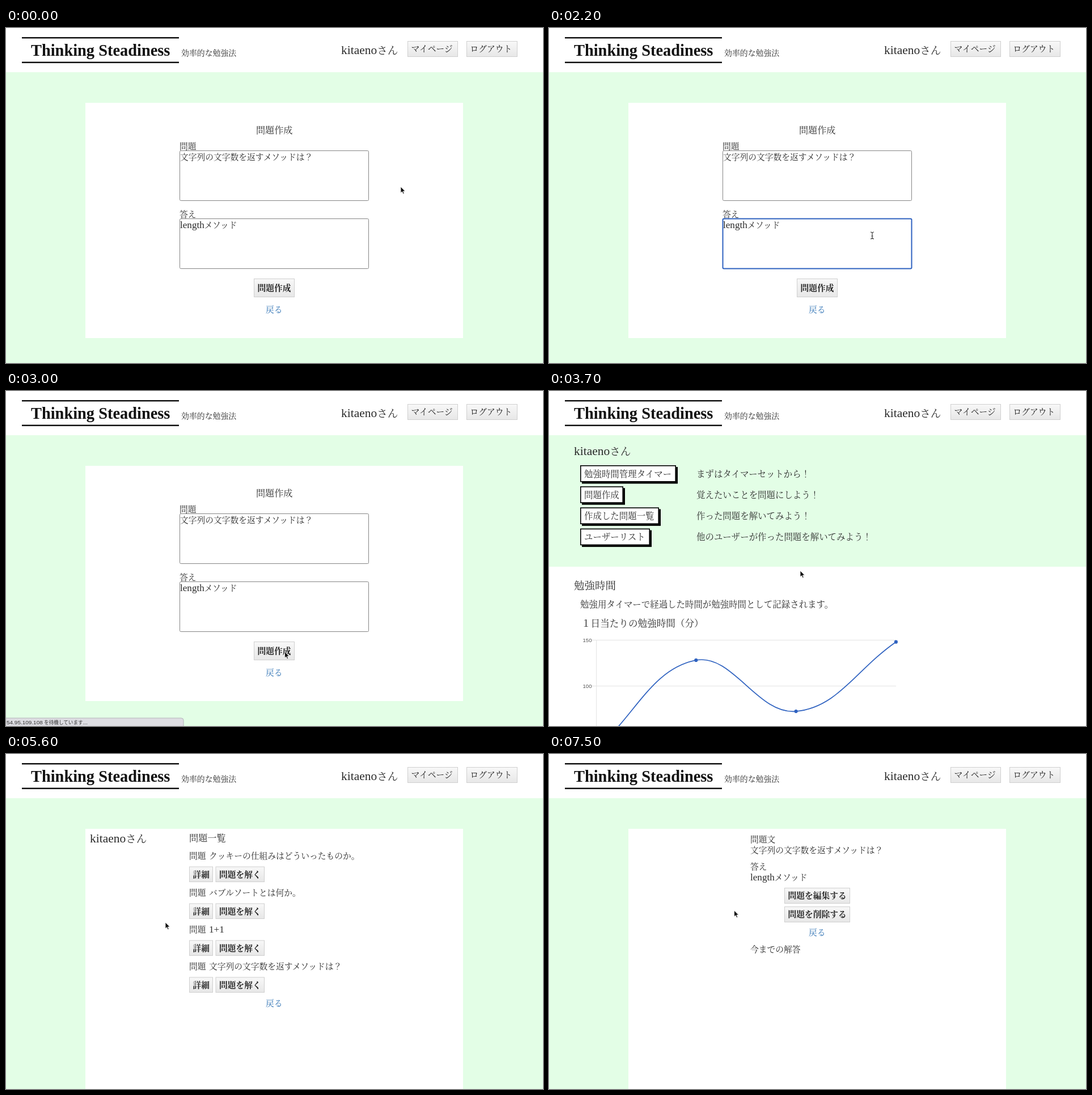
An HTML page for the animation above (7.6 s loop, 947 by 591 pixels).

```html
<!DOCTYPE html>
<html lang="ja">
<head>
<meta charset="utf-8">
<style>
  html, body { margin: 0; width: 100%; height: 100%; overflow: hidden; background: #fff; }
  svg { display: block; width: 947px; height: 591px; }
  text { font-family: "Liberation Serif", "Noto Serif CJK JP", "Noto Sans CJK JP", "Noto Sans CJK", serif; font-weight: 500; white-space: pre; }
  .sans { font-family: "Liberation Sans", "Noto Sans CJK JP", "Noto Sans CJK", sans-serif; font-weight: 400; }
  .strong { font-weight: 600; }
  .title { font-weight: 700; }
</style>
</head>
<body>
<svg id="stage" viewBox="0 0 947 591" lang="ja"></svg>
<script>
const LOOP = 7600, GREEN = '#e3fee6', LINK = '#2c70b3', BLUE = '#2f62c0';
const USER = 'kitaenoさん', QUESTION = '文字列の文字数を返すメソッドは？', ANSWER = 'lengthメソッド';

// Text by left edge and vertical centre; Latin runs are set a little larger than kana.
const text = (x, cy, size, str, fill = '#2b2b2b', attrs = '') => {
  const body = str.replace(/[a-z0-9+.\/]+/g, m => `<tspan font-size="${size * 1.16}">${m}</tspan>`);
  return `<text x="${x}" y="${cy + size * .365}" font-size="${size}" fill="${fill}" ${attrs}>${body}</text>`;
};
const rect = (x, y, w, h, fill, attrs = '') =>
  `<rect x="${x}" y="${y}" width="${w}" height="${h}" fill="${fill}" ${attrs}/>`;
const line = (x1, y1, x2, y2, color, width = 1) =>
  `<path d="M${x1} ${y1}L${x2} ${y2}" stroke="${color}" stroke-width="${width}"/>`;
const button = (x, y, w, h, label, style = 'strong') =>
  rect(x + .5, y + .5, w - 1, h - 1, 'url(#face)', 'stroke="#cfcfcf"') +
  text(x + 6.6, y + h / 2, 14.75, label, '#222', `class="${style}"`);
const backLink = cy => text(458, cy, 14.75, '戻る', LINK);
const group = (id, body) => `<g id="${id}">${body}</g>`;

const header = rect(0, 0, 947, 78, '#fff') +
  line(28, 17.3, 305, 17.3, '#111', 2.4) + line(28, 60.8, 305, 60.8, '#111', 2.4) +
  '<text class="title" x="44" y="48.5" font-size="28.4" fill="#111">Thinking Steadiness</text>' +
  text(309, 44, 13.9, '効率的な勉強法') + text(591, 39, 18.5, USER) +
  button(708, 23, 89, 28, 'マイページ', '') + button(812, 23, 90, 28, 'ログアウト', '');

const area = (id, y) =>
  rect(306.5, y + .5, 333, 88, '#fff', `id="${id}" rx="2" stroke="#858585"`);
const formPage = rect(140, 132, 666, 415, '#fff') +
  text(441, 180, 16.1, '問題作成') +
  text(306, 208.5, 14.75, '問題') + area('area1', 216) + text(307, 228, 14.75, QUESTION) +
  '<path id="caret" d="M543.5 221V235" stroke="#555"/>' +
  text(306, 328.5, 14.75, '答え') + area('area2', 336) + text(307, 348, 14.75, ANSWER) +
  button(437, 442, 72, 33, '問題作成') + backLink(497);

const menu = [
  ['勉強時間管理タイマー', 169, 'まずはタイマーセットから！'],
  ['問題作成', 76, '覚えたいことを問題にしよう！'],
  ['作成した問題一覧', 139, '作った問題を解いてみよう！'],
  ['ユーザーリスト', 123, '他のユーザーが作った問題を解いてみよう！']
];
const menuRow = ([label, w, note], i) => {
  const y = 131 + i * 37.2;
  return rect(58, y + 3, w, 29.5, '#000') +
    rect(55.8, y + .8, w - 1.6, 28, '#fff', 'stroke="#000" stroke-width="1.6"') +
    text(62, y + 15, 15.45, label, '#2b2b2b', `id="menu${i}"`) + text(260, y + 15, 15.45, note);
};
const myPage = rect(0, 310, 947, 281, '#fff') + text(44, 106, 18.5, USER) +
  menu.map(menuRow).join('') +
  text(44, 343, 18.5, '勉強時間') +
  text(55, 376.5, 15.45, '勉強用タイマーで経過した時間が勉強時間として記録されます。') +
  text(57, 410, 16.6, '１日当たりの勉強時間（分）') +
  [150, 100].map((v, i) => line(75, 439.5 + i * 81, 612, 439.5 + i * 81, '#e4e4e4') +
    `<text class="sans" x="75.5" y="${442.7 + i * 81}" font-size="9.6" text-anchor="end" fill="#555">${v}</text>`).join('') +
  line(83.5, 439, 83.5, 591, '#e4e4e4') + group('chart', '');

const questions = ['クッキーの仕組みはどういったものか。', 'バブルソートとは何か。', '1+1', QUESTION];
const listPage = rect(140, 132, 666, 459, '#fff') +
  text(148, 149, 18.5, USER) + text(323, 148.5, 16.2, '問題一覧') +
  questions.map((q, i) => {
    const y = 180 + i * 65;
    return text(323, y, 14.75, '問題') + text(358, y, 14.75, q) +
      button(323, y + 18.5, 42, 27.5, '詳細') + button(369.5, y + 18.5, 86.5, 27.5, '問題を解く');
  }).join('') + backLink(440);

const detailPage = rect(140, 132, 666, 459, '#fff') +
  text(355, 151, 14.75, '問題文') + text(355, 169.5, 14.75, QUESTION) +
  text(355, 199, 14.75, '答え') + text(355, 217.5, 14.75, ANSWER) +
  button(415, 236, 116, 28, '問題を編集する') + button(415, 269, 116, 28, '問題を削除する') +
  backLink(315) + text(355, 345, 14.75, '今までの解答');

const pages = [formPage, myPage, listPage, detailPage];
const cursors = {
  arrow: '<path d="M0 0V11L2.6 8.7L4.4 12.8L6.2 12L4.5 8H8Z" fill="#111" stroke="#fff" stroke-width=".8"/>',
  beam: '<path d="M-3 -6Q0 -6 0 -4Q0 -6 3 -6M0 -5V5M-3 6Q0 6 0 4Q0 6 3 6M-1.5 1H1.5" fill="none" stroke="#333" stroke-width="1.1"/>',
  hand: '<path d="M-1 0Q.8 -1 1.2 1L2 4L5.5 4.2Q8 4.5 8 7V10L6.5 13H1L-3 8Q-3 6 -1 7.2L-2 1Z" fill="#fff" stroke="#222"/>'
};

const stage = document.getElementById('stage');
stage.innerHTML = `<defs><linearGradient id="face" x2="0" y2="1">
  <stop stop-color="#f8f8f8"/><stop offset="1" stop-color="#e7e7e7"/></linearGradient></defs>` +
  rect(0, 0, 947, 591, GREEN) + header + pages.map((p, i) => group('page' + i, p)).join('') +
  group('status', '') + group('cursor', Object.entries(cursors).map(e => group(...e)).join(''));
const $ = id => document.getElementById(id);
const show = (id, on) => $(id).setAttribute('display', on ? 'inline' : 'none');

// Spline through the daily minutes, rising from the zero line as k goes 0 to 1.
function chart(k) {
  const p = [30, 128, 72, 148].map((v, i) => [83 + i * 176.3, 681 - v * 1.61 * k]);
  const dist = (a, b) => Math.hypot(a[0] - b[0], a[1] - b[1]);
  const handles = p.map((c, i) => {
    const a = p[i - 1] || c, b = p[i + 1] || c, da = dist(a, c), db = dist(c, b);
    const at = f => [c[0] + f * (b[0] - a[0]), c[1] + f * (b[1] - a[1])];
    return [at(-.4 * da / (da + db)), at(.4 * db / (da + db))];
  });
  const d = p.slice(1).map((c, i) => `C${handles[i][1]} ${handles[i + 1][0]} ${c}`).join('');
  return `<path d="M${p[0]}${d}" fill="none" stroke="${BLUE}" stroke-width="1.7"/>` +
    p.map(c => `<circle cx="${c[0]}" cy="${c[1]}" r="3.1" fill="${BLUE}"/>`).join('');
}

function statusBar(w, label) {
  return `<path d="M-1 577H${w - 4}Q${w} 577 ${w} 581V592H-1Z" fill="#dddde2" stroke="#b5b5ba"/>` +
    text(1, 585, 8.6, label, '#333', 'class="sans"');
}

// Pointer stops: time, x, y.
const stops = [
  [0, 696, 280], [800, 696, 280], [1300, 617, 250], [1600, 617, 250], [1900, 575, 365],
  [2200, 570, 366], [2600, 491.5, 460], [3200, 491.5, 460], [3600, 443, 317], [3700, 443, 317],
  [4300, 178, 214], [4800, 178, 214], [5300, 281, 297], [5700, 281, 297], [6300, 342, 406],
  [6800, 342, 406], [7200, 295, 358], [7500, 326.5, 276], [7600, 326.5, 276]
];
function pointer(t) {
  const i = stops.findIndex(s => s[0] > t), [t0, x0, y0] = stops[i - 1], [t1, x1, y1] = stops[i];
  const u = (t - t0) / (t1 - t0), e = u * u * (3 - 2 * u);
  return [x0 + (x1 - x0) * e, y0 + (y1 - y0) * e];
}

function focusRing(id, on) {
  $(id).setAttribute('stroke', on ? BLUE : '#858585');
  $(id).setAttribute('stroke-width', on ? 2 : 1);
}

function draw(now) {
  const t = Math.floor(now % LOOP / 100) * 100;
  const page = t < 3100 ? 0 : t < 4800 ? 1 : t < 7000 ? 2 : 3;
  pages.forEach((_, i) => show('page' + i, i === page));

  const focus1 = t >= 1300 && t < 1900;
  focusRing('area1', focus1);
  focusRing('area2', t >= 1900 && t < 2600);
  show('caret', focus1);

  $('chart').innerHTML = page === 1 ? chart(1 - (1 - Math.min(1, (t - 3100) / 600)) ** 4) : '';

  const [x, y] = pointer(t);
  const inside = (l, top, r, b) => x > l && x < r && y > top && y < b;
  const hover = page === 1 && inside(55, 205, 194, 235);
  const typing = page === 0 && (inside(306, 216, 640, 305) || inside(306, 336, 640, 426));
  const kind = hover ? 'hand' : typing ? 'beam' : 'arrow';
  Object.keys(cursors).forEach(k => show(k, k === kind));
  $('cursor').setAttribute('transform', `translate(${x} ${y})`);
  $('menu2').setAttribute('fill', hover ? '#23527c' : '#2b2b2b');
  $('menu2').setAttribute('text-decoration', hover ? 'underline' : 'none');

  const waiting = t >= 2800 && t < 3300 || t >= 6700 && t < 7100;
  $('status').innerHTML = waiting ? statusBar(313, '54.95.109.108 を待機しています...') :
    hover || t >= 4800 && t < 5000 ? statusBar(152, '54.95.109.108/users/2/questions') : '';
}

let start;
function tick(now) {
  start ??= now;
  draw(now - start);
  requestAnimationFrame(tick);
}
draw(0);
requestAnimationFrame(tick);
</script>
</body>
</html>
```
